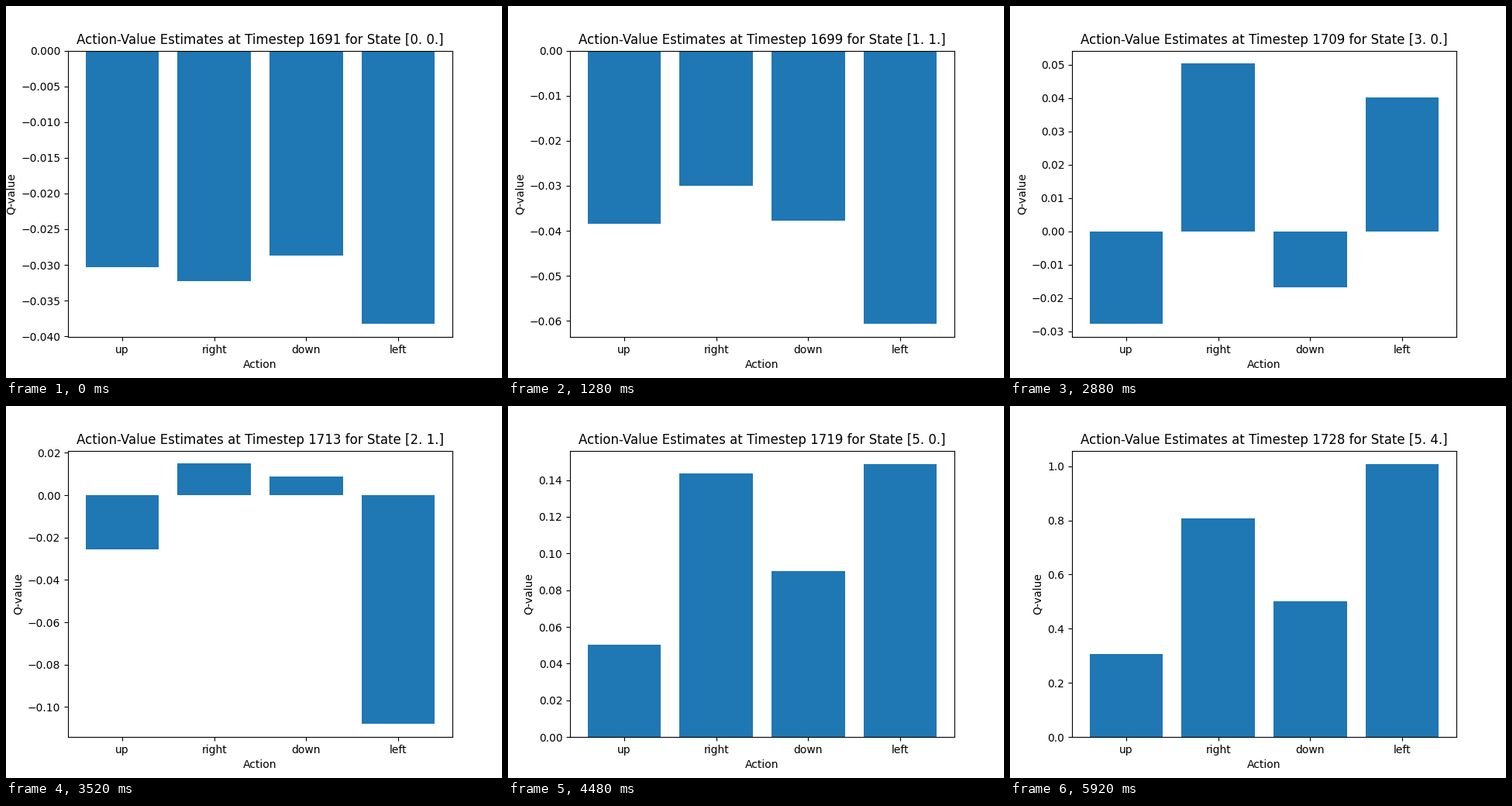
Recreate the animation shown at these times as a matplotlib script. Size 640 by 480 pixels, loop 6080 ms.

```python
import numpy as np
import matplotlib.pyplot as plt
from matplotlib.animation import FuncAnimation

ACTIONS = ["up", "right", "down", "left"]
GOAL = (5, 4)

# Key points of the walk: timestep, grid cell, learned action values
KEYS = [
    (1691, (0, 0), [-0.0303, -0.03226, -0.02868, -0.0382]),
    (1699, (1, 1), [-0.03844, -0.0300, -0.03776, -0.06057]),
    (1703, (3, 1), [-0.0029, 0.01505, -0.01585, -0.05987]),
    (1709, (3, 0), [-0.02778, 0.05033, -0.01675, 0.04025]),
    (1713, (2, 1), [-0.0256, 0.0149, 0.00882, -0.10808]),
    (1719, (5, 0), [0.0503, 0.1436, 0.0904, 0.1486]),
    (1728, GOAL, [0.3067, 0.8074, 0.5013, 1.0071]),
]
LEARNED = {cell: values for _, cell, values in KEYS}
START, END = KEYS[0][0], KEYS[-1][0]
PROFILE = np.array(LEARNED[GOAL])


def cell_at(step):
    """Spread the moves between two key cells evenly, vertical ones first."""
    k = max(i for i, key in enumerate(KEYS) if key[0] <= step)
    t0, (x0, y0), _ = KEYS[k]
    t1, (x1, y1), _ = KEYS[min(k + 1, len(KEYS) - 1)]
    dx, dy = x1 - x0, y1 - y0
    moves = (step - t0) * (abs(dx) + abs(dy)) // max(t1 - t0, 1)
    vertical = min(moves, abs(dy))
    return (x0 + int(np.sign(dx)) * (moves - vertical),
            y0 + int(np.sign(dy)) * vertical)


def action_values(cell):
    """Reward fades away from the goal; the step cost grows with distance."""
    if cell in LEARNED:
        return LEARNED[cell]
    x, y = cell
    reward = 0.67 ** (GOAL[1] - y + 2.5 * (GOAL[0] - x))
    cost = 0.04 * (1 - (x / GOAL[0]) ** 2)
    return reward * PROFILE - cost * (0.7 + 0.3 * PROFILE)


fig, ax = plt.subplots(figsize=(6.4, 4.8), dpi=100)


def draw(i):
    step = START + i
    x, y = cell_at(step)
    ax.clear()
    ax.bar(ACTIONS, action_values((x, y)))
    ax.set_title(f"Action-Value Estimates at Timestep {step} "
                 f"for State [{x}. {y}.]")
    ax.set_xlabel("Action")
    ax.set_ylabel("Q-value")


anim = FuncAnimation(fig, draw, frames=END - START + 1, interval=160,
                     repeat=True)
plt.show()
```
